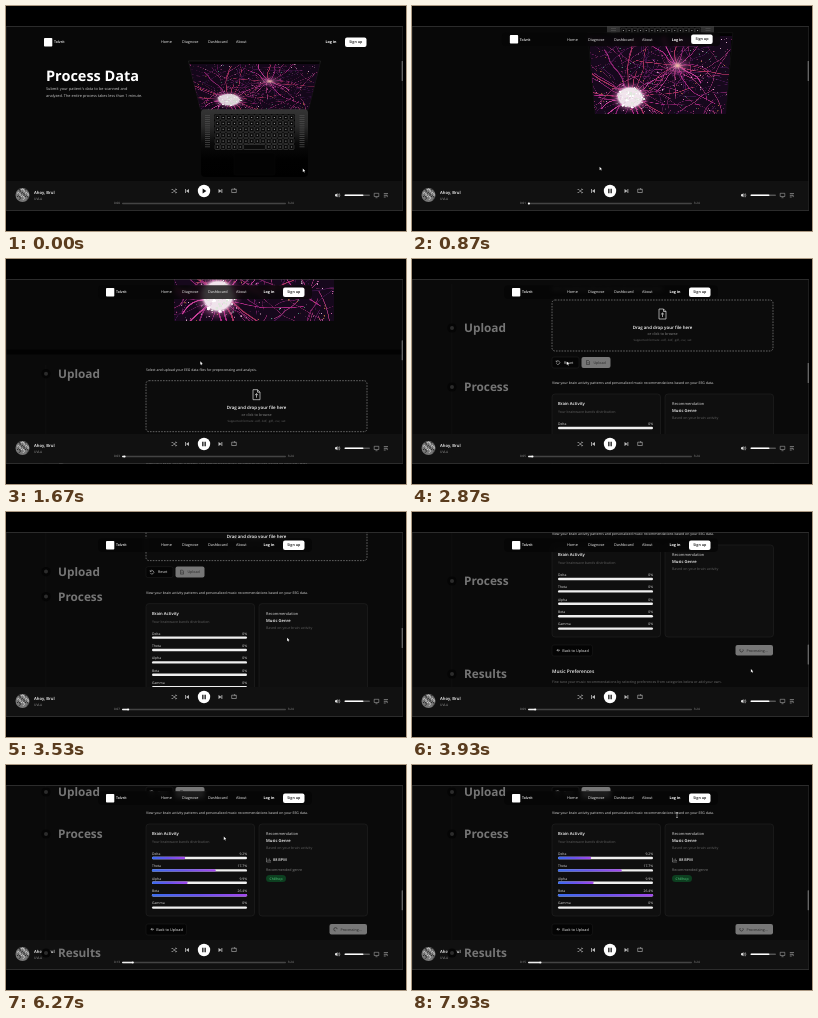
Write an HTML page with a canvas that moves like this. It is 400 px wide and 225 px high and loops after 8000 ms.

```html
<!DOCTYPE html>
<html lang="en">
<head>
<meta charset="utf-8">
<title>Brain music demo</title>
<style>
html, body { margin: 0; width: 100%; height: 100%; overflow: hidden; background: #000; }
canvas { display: block; width: 100vw; height: 100vh; }
</style>
</head>
<body>
<canvas id="stage"></canvas>
<script>
const LOOP = 8000;
const stage = document.getElementById('stage');
const ctx = stage.getContext('2d');

// [time, value...] keys, eased between neighbours
const SCROLL = [[0, -332], [620, -332], [1170, -132], [1400, -110], [2200, 0], [3270, 0], [3850, 102],
  [5000, 102], [5280, 154], [5420, 154], [5850, 76], [LOOP, 76]];
const CURSOR = [[0, 297, 164], [500, 199, 186], [680, 199, 186], [1150, 168, 120], [1500, 168, 120],
  [1950, 250, 70], [2350, 184, 104], [2500, 184, 104], [2800, 155, 104], [3250, 155, 104],
  [3700, 340, 138], [3900, 340, 159], [4100, 326, 150], [4850, 254, 60], [5330, 253, 58],
  [6200, 218, 73], [7580, 218, 73], [7880, 265, 50], [LOOP, 265, 50]];
const SONG = [[0, 0], [530, 0], [1200, 2.2], [2870, 5.5], [3930, 9], [5330, 11.3], [6270, 13.4], [LOOP, 15.5]];
const BANDS = [['Delta', 9.2], ['Theta', 17.7], ['Alpha', 9.9], ['Beta', 26.4], ['Gamma', 0]];

const clamp = (v, lo = 0, hi = 1) => Math.min(hi, Math.max(lo, v));
const mix = (a, b, k) => a + (b - a) * k;
const smooth = k => k * k * (3 - 2 * k);

function keyed(keys, t, ease = smooth) {
  const i = Math.max(1, keys.findIndex(k => k[0] >= t));
  const a = keys[i - 1], b = keys[i];
  const k = ease(clamp((t - a[0]) / (b[0] - a[0])));
  return a.slice(1).map((v, n) => mix(v, b[n + 1], k));
}

function text(s, x, y, size, color = '#eee', weight = 400, align = 'left') {
  ctx.font = `${weight} ${size}px "Open Sans", "Noto Sans", sans-serif`;
  ctx.textAlign = align;
  ctx.textBaseline = 'middle';
  ctx.fillStyle = color;
  ctx.fillText(s, x, y);
}

function box(x, y, w, h, r, fill, stroke) {
  ctx.beginPath();
  ctx.roundRect(x, y, w, h, r);
  if (fill) { ctx.fillStyle = fill; ctx.fill(); }
  if (stroke) { ctx.strokeStyle = stroke; ctx.lineWidth = .5; ctx.stroke(); }
}

function disc(x, y, r, fill, c = ctx) {
  c.beginPath();
  c.arc(x, y, r, 0, 7);
  c.fillStyle = fill;
  c.fill();
}

function path(d, x, y, color, width = .6, filled) {
  ctx.save();
  ctx.translate(x, y);
  const p = new Path2D(d);
  ctx.strokeStyle = ctx.fillStyle = color;
  ctx.lineWidth = width;
  filled ? ctx.fill(p) : ctx.stroke(p);
  ctx.restore();
}

function gradient(x0, y0, x1, y1, ...colors) {
  const g = ctx.createLinearGradient(x0, y0, x1, y1);
  colors.forEach((c, i) => g.addColorStop(i / (colors.length - 1), c));
  return g;
}

// Glowing neuron picture, painted once at 160 x 120 units
const neuron = (() => {
  const cv = document.createElement('canvas');
  cv.width = 480; cv.height = 360;
  const c = cv.getContext('2d');
  c.scale(3, 3);
  c.fillStyle = '#16081c';
  c.fillRect(0, 0, 160, 120);
  let seed = 7;
  const rnd = () => (seed = seed * 16807 % 2147483647) / 2147483647;
  const pick = list => list[Math.floor(rnd() * list.length)];
  const branch = (x, y, angle, length, width, hues) => {
    c.strokeStyle = pick(hues);
    c.lineWidth = width;
    c.beginPath();
    c.moveTo(x, y);
    for (let i = 0; i < 8; i++) {
      angle += (rnd() - .5) * .6;
      x += Math.cos(angle) * length / 8;
      y += Math.sin(angle) * length / 8;
      c.lineTo(x, y);
    }
    c.stroke();
  };
  const dim = ['#6b1d5c', '#4a1650', '#7d2460', '#3c1548', '#93306e'];
  const vivid = ['#b02a86', '#c8409a', '#8a2370', '#a8325e'];
  for (let i = 0; i < 120; i++) branch(rnd() * 160, rnd() * 120, rnd() * 6.3, 20 + rnd() * 50, .3 + rnd() * .7, dim);
  for (let i = 0; i < 24; i++) branch(44, 95, i * .262, 40 + rnd() * 55, .6 + rnd() * 1.1, vivid);
  for (let i = 0; i < 16; i++) branch(100, 46, i * .39, 35 + rnd() * 45, .5 + rnd(), vivid);
  for (let i = 0; i < 420; i++)
    disc(rnd() * 160, rnd() * 120, .2 + rnd() * .6, pick(['#c060a0', '#a03a78', '#d8a8c8', '#a8683c', '#4f8a78']), c);
  const glow = (x, y, r, core, center) => {
    const g = c.createRadialGradient(x, y, core, x, y, r);
    g.addColorStop(0, center);
    g.addColorStop(.3, '#d878b866');
    g.addColorStop(1, '#a0287800');
    disc(x, y, r, g, c);
  };
  glow(44, 95, 25, 14, '#f0e4ec');
  glow(100, 46, 18, 1, '#e8b8a8');
  for (let i = 0; i < 130; i++) {
    const a = rnd() * 6.3, r = rnd() * 17;
    disc(44 + Math.cos(a) * r, 95 + Math.sin(a) * r, .5 + rnd(), pick(['#fff', '#f4e6ee', '#dfe9dc', '#e6cfe0']), c);
  }
  return cv;
})();

function laptopBase(dy) {
  ctx.save();
  ctx.translate(0, dy);
  box(195, 103, 107, 68, 4, gradient(0, 103, 0, 171, '#343434', '#2a2a2a', '#0a0a0a', '#010101', '#000'));
  ctx.fillStyle = '#505050';
  for (const x of [199, 293.5])
    for (let i = 0; i < 16; i++) ctx.fillRect(x, 109 + i * 2.1, 5, .7);
  box(208, 108, 81, 36.5, 1.5, '#040404');
  for (let r = 0; r < 6; r++) for (let k = 0; k < 14; k++) {
    const space = r === 5 && k === 5;
    if (r === 5 && k > 5 && k < 9) continue;
    const x = 209 + k * 5.7, y = 109 + r * 5.9, w = space ? 22 : 4.9;
    box(x, y, w, 5, .7, '#0b0b0b', '#555');
    if (space) continue;
    ctx.fillStyle = '#999';
    ctx.fillRect(x + 1.9, y + 2, 1.1, 1);
  }
  box(228, 147, 41, 22, 2, '#030303', '#0b0b0b');
  ctx.restore();
}

// Perspective lid: trapezoid rows that straighten as the page scrolls
function lid(e, shift) {
  const top = mix(58, -7, e) + shift, bottom = mix(103, 113, e) + shift;
  const halfTop = mix(65, 80, e), halfBottom = mix(54, 80, e), mid = mix(248.5, 248, e);
  if (e < 1) {
    ctx.beginPath();
    ctx.moveTo(mid - halfTop - 1, top - 3);
    ctx.lineTo(mid + halfTop + 1, top - 3);
    ctx.lineTo(mid + halfBottom, bottom);
    ctx.lineTo(mid - halfBottom, bottom);
    ctx.closePath();
    ctx.fillStyle = '#020202';
    ctx.fill();
    ctx.strokeStyle = `rgba(110,110,110,${.5 * (1 - e)})`;
    ctx.lineWidth = .4;
    ctx.stroke();
  }
  const rows = 90, h = (bottom - top) / rows;
  for (let i = 0; i < rows; i++) {
    const half = mix(halfTop, halfBottom, i / rows);
    ctx.drawImage(neuron, 0, i * 4, 480, 4, mid - half, top + i * h, half * 2, h + .3);
  }
}

function hero(S) {
  const e = clamp((S + 332) / 200), dy = -(S + 332);
  text('Process Data', 40, 71.6 + dy, 14.5, '#fff', 700);
  text("Submit your patient's data to be scanned and", 40, 83 + dy, 3.85, '#ccc');
  text('analyzed. The entire process takes less than 1 minute.', 40, 89.7 + dy, 3.85, '#ccc');
  laptopBase(dy);
  lid(e, -Math.max(0, S + 132));
}

function upload() {
  text('Select and upload your EEG data files for preprocessing and analysis.', 140, 30.5, 3.47, '#ddd');
  ctx.setLineDash([1.6, 1.2]);
  box(140, 41, 221, 51, 3, '#0c0c0c', '#bbb');
  ctx.setLineDash([]);
  path('M1-5H-3.5V5H3.5V-2.5L1-5V-2.5H3.5M0 3V-1M-1.6.5L0-1L1.6.5', 250.5, 55, '#ddd', .7);
  text('Drag and drop your file here', 250.5, 68.4, 4.4, '#fff', 600, 'center');
  text('or click to browse', 250.5, 75.4, 3.7, '#888', 400, 'center');
  text('Supported formats: .edf, .bdf, .gdf, .csv, .set', 250.5, 81.6, 2.9, '#666', 400, 'center');
  box(140, 98, 27, 11, 2, '#050505', '#222');
  path('M-1.6-.8A1.8 1.8 0 1 1-1.7.8M-1.8-2V-.6H-.4', 146, 103.5, '#ddd', .5);
  text('Reset', 152, 103.8, 3.6, '#eee', 500);
  box(169.5, 98, 29, 11, 2, '#777');
  path('M.5-2H-1.5V2H1.5V-1L.5-2M0 1V-.5', 176, 103.5, '#222', .5);
  text('Upload', 181.5, 103.8, 3.6, '#252525');
}

function bands(t) {
  const grow = smooth(clamp((t - 4200) / 600));
  BANDS.forEach(([name, value], i) => {
    const y = 165 + i * 12.4;
    text(name, 146, y, 3.4, '#ddd', 500);
    text((value * grow).toFixed(1).replace('.0', '') + '%', 241, y, 3.4, '#ddd', 500, 'right');
    box(146, y + 2.8, 95, 2.4, 1.2, '#f0f0f0');
    const w = 95 * value / 26.4 * grow;
    if (w > 0) box(146, y + 2.8, w, 2.4, 1.2, gradient(146, 0, 146 + w, 0, '#3b6cf0', '#6a52ee', '#a348ee'));
  });
}

function spinner(x, y, t) {
  ctx.strokeStyle = '#222';
  ctx.lineWidth = .6;
  ctx.beginPath();
  ctx.arc(x, y, 1.7, t / 160, t / 160 + 4.7);
  ctx.stroke();
}

function results(t) {
  text('View your brain activity patterns and personalized music recommendations based on your EEG data.', 140, 124.4, 3.47, '#ddd');
  for (const x of [140, 253]) box(x, 135, 108.5, 92, 3, '#0f0f0f', '#262626');
  text('Brain Activity', 146, 145.4, 4.2, '#fff', 600);
  text('Your brainwave bands distribution', 146, 153.4, 3.6, '#606060');
  bands(t);
  text('Recommendation', 260, 145.3, 3.9, '#ddd');
  text('Music Genre', 260, 151.9, 4.1, '#fff', 600);
  text('Based on your brain activity', 260, 159.4, 3.6, '#606060');
  if (t > 4400) {
    path('M0-2.2V2H4.5M1.5 1V-.5M2.8 1V-1.5M4 1V0', 260.5, 171, '#aaa', .5);
    text('88 BPM', 267, 171.3, 3.8, '#eee', 600);
    text('Recommended genre', 260, 181.3, 3.6, '#808080');
    box(260, 186, 20, 7, 3.5, '#0d3f20');
    text('Chillhop', 270, 189.7, 3.4, '#58d685', 400, 'center');
  }
  box(140, 235, 40.5, 11, 2, '#040404', '#1c1c1c');
  path('M3 0H0M1.3-1.3L0 0L1.3 1.3', 145, 240.3, '#eee', .5);
  text('Back to Upload', 150.3, 240.6, 3.75, '#eee', 500);
  box(323.5, 235, 37.5, 10.5, 2, '#777');
  spinner(329.5, 240.3, t);
  text('Processing...', 334.5, 240.6, 3.65, '#252525');
  text('Music Preferences', 140, 261.6, 4.8, '#eee', 600);
  text('Fine tune your music recommendations by selecting preferences from categories below or add your own.', 140, 272.3, 3.48, '#707070');
}

function timelineLine(S) {
  const top = Math.max(20, 25 - S);
  ctx.fillStyle = '#131313';
  ctx.fillRect(39.6, top, .6, 204 - top);
  const end = 32 + (S - 154) * .3;
  if (end > 20) {
    ctx.fillStyle = gradient(0, 20, 0, end, '#5b52e8', '#7a3fd0');
    ctx.fillRect(39.3, 20, 1.1, end - 20);
  }
}

function stickyTitle(label, natural, limit, S) {
  const y = Math.min(Math.max(natural - S, 69), limit - S);
  if (y > 215) return;
  disc(40, y, 4.6, '#050505');
  disc(40, y, 2, '#2c2c2c');
  text(label, 52, y + 1.3, 11.8, '#757575', 700);
}

function nav(S) {
  const k = smooth(clamp((S + 325) / 90));
  const left = mix(30, 92, k), right = mix(368, 306, k), y = 36.3 - 3 * k;
  if (k > 0) {
    ctx.save();
    ctx.beginPath();
    ctx.roundRect(left, y - 7, right - left, 13.8, 4);
    ctx.clip();
    ctx.filter = 'blur(2px)';
    ctx.drawImage(stage, 0, 0, 400, 225);
    ctx.filter = 'none';
    ctx.fillStyle = `rgba(6,6,6,${.78 * k})`;
    ctx.fillRect(left, 20, right - left, 30);
    ctx.restore();
  }
  box(left + 8, y - 4.3, 8.3, 8.5, .8, '#fff');
  text('Tolvrit', left + 18, y + .2, 3.5, '#fff', 600);
  [['Home', 155], ['Diagnose', 176], ['Dashboard', 202], ['About', 230]]
    .forEach(([label, x]) => text(label, x, y + .2, 3.8, '#eee', 500));
  text('Log in', right - 48.5, y + .2, 3.7, '#fff', 700);
  box(right - 29, y - 4.8, 21.5, 9.5, 2, '#fff');
  text('Sign up', right - 18.2, y + .1, 3.7, '#111', 600, 'center');
}

const clock = s => `0:${String(Math.floor(s)).padStart(2, '0')}`;

function player(t) {
  const [song] = keyed(SONG, t, k => k);
  ctx.fillStyle = '#111';
  ctx.fillRect(0, 175, 397, 29);
  disc(16.5, 189, 7, '#777');
  for (let i = 0; i < 9; i++)
    path('M0 0q2-2 3 0t-1 3', 11 + i % 3 * 4, 184 + Math.floor(i / 3) * 3.4, i % 2 ? '#ddd' : '#1c1c1c', .8);
  text('Ahoy, Brul', 28, 187.1, 4.2, '#fff', 600);
  text('UVLA', 28, 192.8, 3.3, '#999');

  const grey = '#bbb';
  path('M-2.5-1.5H-1L1.5 1.5H2.5M-2.5 1.5H-1L1.5-1.5H2.5M1.7-2.4L2.6-1.5L1.7-.6M1.7.6L2.6 1.5L1.7 2.4', 168, 185, grey);
  path('M2-2V2L-1 0ZM-1.8-2H-1V2H-1.8Z', 181, 185, grey, 1, true);
  path('M-2-2V2L1 0ZM1.8-2H1V2H1.8Z', 214.5, 185, grey, 1, true);
  path('M1-1.8H-2.3V1.5H2.3V-1.8H1M.2-2.8L1.2-1.8L.2-.8', 228, 185, grey);
  disc(198, 185, 6.2, '#fff');
  if (t < 530) path('M-1.4-2.4V2.4L2.4 0Z', 198, 185, '#111', 1, true);
  else path('M-1.8-2.2H-.5V2.2H-1.8ZM.5-2.2H1.8V2.2H.5Z', 198, 185, '#111', 1, true);

  text(clock(song), 114, 197.7, 3, '#999', 400, 'right');
  text('3:24', 281.7, 197.7, 3, '#999');
  box(116, 196.8, 164, 1.5, .7, '#444');
  if (song > 0) {
    const x = 116 + 164 * song / 204;
    box(116, 196.8, x - 116, 1.5, .7, '#eee');
    disc(x, 197.5, 1.1, '#fff');
  }
  path('M-2-1H-1L.5-2V2L-1 1H-2Z', 331, 189.3, '#ddd', 1, true);
  path('M1.5-1.2Q2.3 0 1.5 1.2M2.2-2Q3.6 0 2.2 2', 331, 189.3, grey, .6);
  box(338.5, 188.4, 25.5, 1.6, .8, '#555');
  box(338.5, 188.4, 19, 1.6, .8, '#fff');
  path('M-2.3-2H2.3V1.2H-2.3ZM-1 2.4H1', 370.5, 189.3, grey, .5);
  path('M-2.2-1.7H2M-2.2 0H1M-2.2 1.7H-.3M1.2 1.8V-.1', 380, 189.3, grey, .6);
}

function cursor(t) {
  const [x, y] = keyed(CURSOR, t);
  if (t > 7800) path('M-1-2.5H1M0-2.5V2.5M-1 2.5H1', x, y, '#ddd', .5);
  else path('M0-1.5V2L.8 1.2L1.4 2.4L1.9 2.2L1.4 1H2.4Z', x - .2, y, '#fff', 1, true);
}

function frame(now) {
  const t = now % LOOP;
  const [S] = keyed(SCROLL, t);
  const w = Math.round(innerWidth * devicePixelRatio), h = Math.round(innerHeight * devicePixelRatio);
  if (stage.width !== w || stage.height !== h) { stage.width = w; stage.height = h; }
  ctx.setTransform(w / 400, 0, 0, h / 225, 0, 0);
  ctx.textRendering = 'geometricPrecision';
  ctx.fillStyle = '#000';
  ctx.fillRect(0, 0, 400, 225);

  ctx.save();
  ctx.beginPath();
  ctx.rect(0, 20, 397, 185);
  ctx.clip();
  ctx.fillStyle = '#080808';
  ctx.fillRect(0, 20, 397, 185);
  if (S < 110) hero(S);
  ctx.fillStyle = '#020202';
  ctx.fillRect(0, 10 - S, 397, 5);
  ctx.fillStyle = '#0a0a0a';
  ctx.fillRect(0, 15 - S, 397, 500);
  timelineLine(S);
  ctx.save();
  ctx.translate(0, -S);
  upload();
  results(t);
  ctx.restore();
  nav(S);
  player(t);
  stickyTitle('Upload', 34, 103, S);
  stickyTitle('Process', 128, 240, S);
  stickyTitle('Results', 264, 900, S);
  cursor(t);
  ctx.restore();

  ctx.fillStyle = '#444';
  ctx.fillRect(0, 20, 397, .6);
  ctx.fillRect(0, 204, 397, .6);
  ctx.fillStyle = '#2a2a2a';
  ctx.fillRect(0, 20, .5, 184);
  ctx.fillRect(396.3, 20, .6, 184);
  box(395.7, Math.max(55, 67 + (S + 132) * .28), 1.1, 20, .5, '#777');
  requestAnimationFrame(frame);
}
requestAnimationFrame(frame);
</script>
</body>
</html>
```
